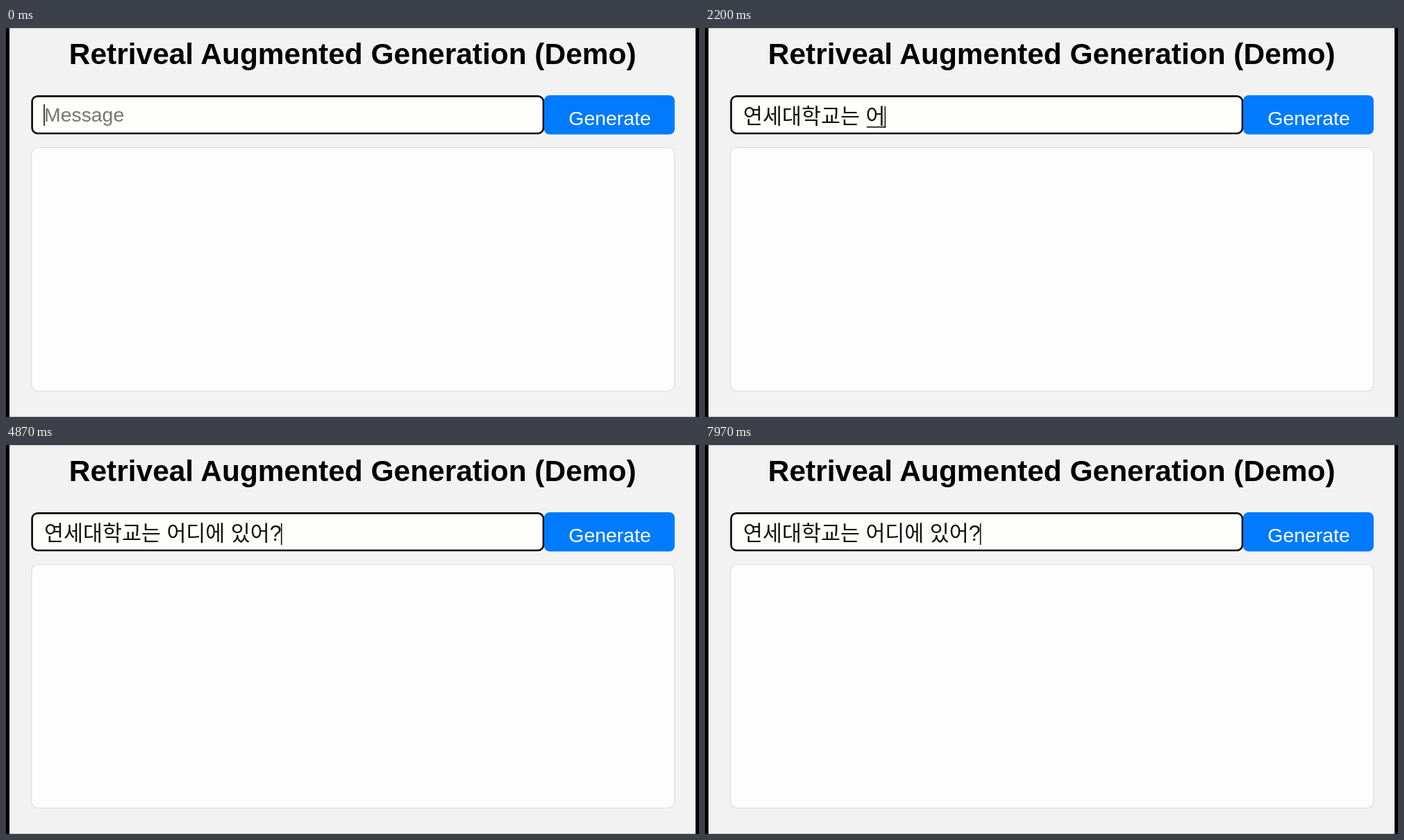
Animation of 998 by 561 pixels, one loop 8 s. Source, as an HTML page:

```html
<!DOCTYPE html>
<html lang="ko">
<head>
<meta charset="utf-8">
<title>Retriveal Augmented Generation (Demo)</title>
<style>
  html, body { margin: 0; width: 100%; height: 100%; overflow: hidden; background: #f2f2f2; }
  svg { display: block; width: 998px; height: 561px; }
  text { font-family: "Liberation Sans", Arial, "Noto Sans CJK KR", "Noto Sans CJK", sans-serif; white-space: pre; }
  .title { font-size: 42.45px; font-weight: bold; text-anchor: middle; }
  .label { font-size: 28.4px; }
  #typed { font-size: 30.43px; font-weight: 300; fill: #111; }
</style>
</head>
<body>
<svg viewBox="0 0 998 561">
  <rect width="998" height="561" fill="#f2f2f2"/>
  <path d="M0 .5H998M0 560.5H998" stroke="#c9c9c9"/>
  <path d="M0 0H5V561H0ZM993 0H998V561H993Z"/>
  <text class="title" x="499.2" y="52">Retriveal Augmented Generation (Demo)</text>
  <rect x="37.6" y="98.3" width="736.4" height="53.7" rx="8" fill="#fefefc" stroke="#0c0c0c" stroke-width="2.7"/>
  <rect x="775" y="97" width="188" height="56.5" rx="8" fill="#007bff"/>
  <text class="label" x="869.5" y="140" fill="#fff" text-anchor="middle">Generate</text>
  <rect x="36.7" y="172.5" width="926" height="351" rx="9" fill="#fdfdfd" stroke="#dcdcdc" stroke-width="1.2"/>
  <text id="placeholder" class="label" x="55" y="135" fill="#757575">Message</text>
  <text id="typed" x="55" y="138"></text>
  <rect id="underline" y="142" height="1.6" fill="#111"/>
  <rect id="caret" width="1.6" height="31" fill="#111"/>
</svg>
<script>
const LOOP = 8000, LEFT = 55, BLINK = 530;
const FIRST_KEY = 570, KEY_STEP = 95, LAST_KEY = 3640;
const sentence = "연세대학교는 어디에 있어?";

// Each key press: number of finished characters, then the one being composed.
const keys = [..."0ㅇ0여0연1ㅅ1세1섿2대2댛3하3학4ㄱ4교4굔5느5는6 7ㅇ7어7얻8디8딩9에10 11ㅇ11이11있12ㅇ12어13?"
  .matchAll(/(\d+)(\D)/g)].map(([, done, char]) => ({ done: +done, char }));

const [placeholder, typed, underline, caret] =
  ["placeholder", "typed", "underline", "caret"].map(id => document.getElementById(id));
const show = (el, on) => el.setAttribute("visibility", on ? "visible" : "hidden");

function draw(t) {
  const pressed = t >= LAST_KEY ? keys.length
    : Math.min(keys.length - 1, Math.max(0, Math.floor((t - FIRST_KEY) / KEY_STEP) + 1));
  const key = keys[pressed - 1];
  const composing = !!key && /[ㄱ-ㅎ가-힣]/.test(key.char);
  typed.textContent = key ? sentence.slice(0, key.done) + key.char : "";

  const width = key ? typed.getComputedTextLength() : 0;
  const start = composing && key.done ? typed.getSubStringLength(0, key.done) : 0;
  underline.setAttribute("x", LEFT + start + 1.5);
  underline.setAttribute("width", Math.max(0, width - start - 1.5));
  caret.setAttribute("x", LEFT + width - 0.8);
  caret.setAttribute("y", key ? 113 : 110);

  const idle = key ? t - LAST_KEY : t;
  show(placeholder, !key);
  show(underline, composing);
  show(caret, idle < 0 || idle % (2 * BLINK) < BLINK);
}

const origin = performance.now();
function tick() {
  draw((performance.now() - origin) % LOOP);
  requestAnimationFrame(tick);
}
tick();
</script>
</body>
</html>
```
